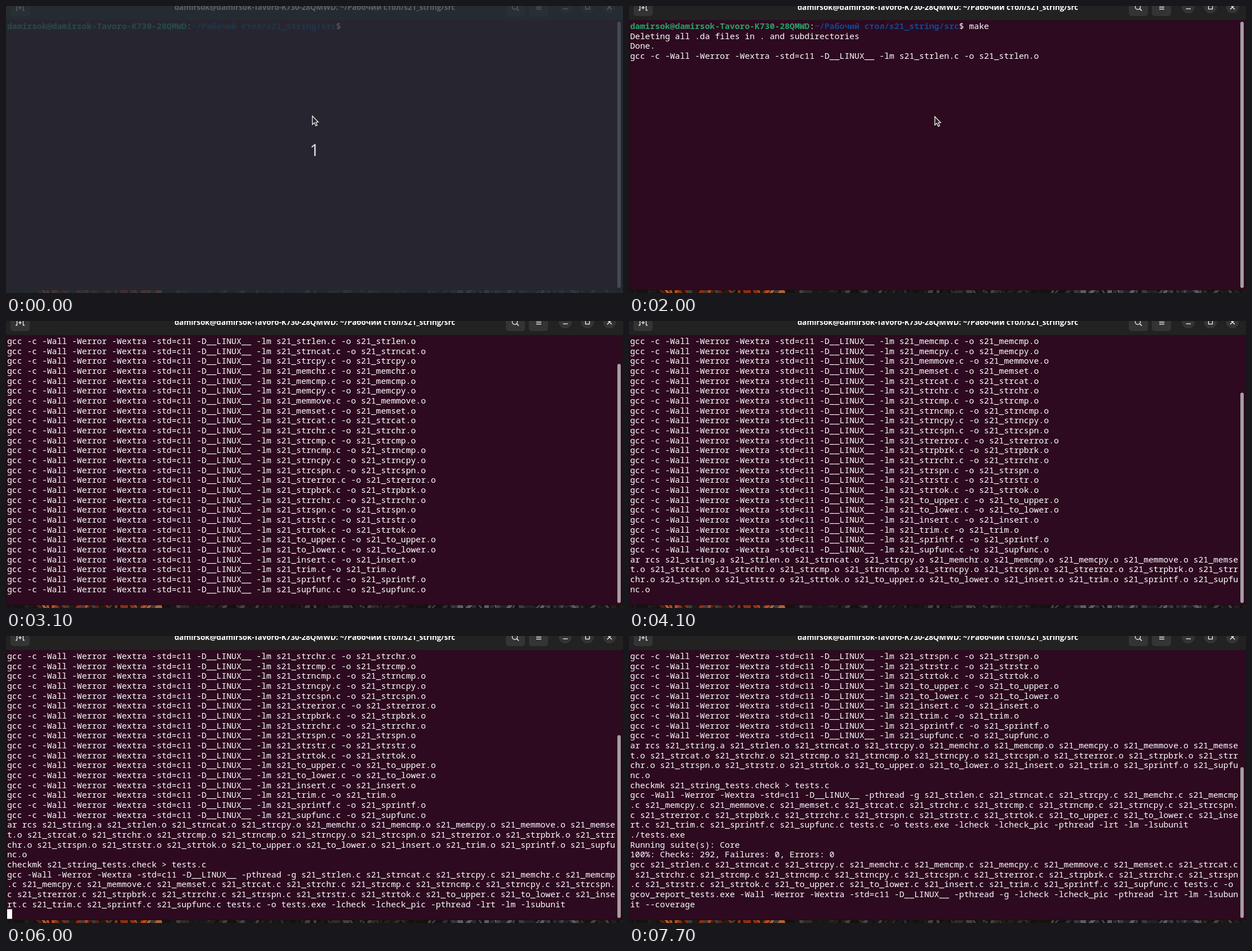
Recreate the animation shown at these times as an HTML page with a canvas. Size 1095 by 511 pixels, loop 8000 ms.

```html
<!DOCTYPE html>
<html lang="ru">
<head>
<meta charset="utf-8">
<title>Terminal build</title>
<style>
  html, body { margin: 0; width: 100%; height: 100%; overflow: hidden; background: #2d0a1f; }
  canvas { display: block; width: 1095px; height: 511px; }
</style>
</head>
<body>
<canvas id="stage" width="1095" height="511"></canvas>
<script>
const W = 1095, H = 511, LOOP = 8000;
const COLS = 122, ROWS = 27, CELL_W = 8.846, CELL_H = 17.67, LEFT = 2, TOP = 27;
const MONO = '14.75px "Noto Sans Mono", "DejaVu Sans Mono", monospace';
const WHITE = '#ffffff', GREEN = '#26a269', BLUE = '#12488b';
const ctx = document.getElementById('stage').getContext('2d');

const login = 'damirsok@damirsok-Tavoro-K730-28QMWD';
const path = '~/Рабочий стол/s21_string/src';
const prompt = `${login}:${path}$ `;

const units = ('strlen strncat strcpy memchr memcmp memcpy memmove memset strcat strchr strcmp ' +
  'strncmp strncpy strcspn strerror strpbrk strrchr strspn strstr strtok to_upper to_lower ' +
  'insert trim sprintf supfunc').split(' ');
const files = ext => units.map(u => `s21_${u}.${ext}`).join(' ');
const flags = '-Wall -Werror -Wextra -std=c11 -D__LINUX__';
const libs = '-lcheck -lcheck_pic -pthread -lrt -lm -lsubunit';

// Output after the per-file compile lines
const later = [
  [3300, `ar rcs s21_string.a ${files('o')}`],
  [5400, 'checkmk s21_string_tests.check > tests.c'],
  [5400, `gcc ${flags} -pthread -g ${files('c')} tests.c -o tests.exe ${libs}`],
  [7100, './tests.exe'],
  [7200, 'Running suite(s): Core'],
  [7200, '100%: Checks: 292, Failures: 0, Errors: 0'],
  [7300, `gcc ${files('c')} tests.c -o gcov_report_tests.exe ${flags} -pthread -g ${libs} --coverage`]
];
const keyTimes = [500, 600, 800, 900];
const blinkTimes = [100, 1700, 2300, 2900, 3500, 4100, 4700, 5400, 6000, 6500, 7100, 7700];
const passed = (times, t) => times.filter(x => x <= t).length;

function compiled(t) {
  if (t < 1400) return 0;
  if (t < 2200) return 1;
  return Math.min(units.length, 1 + Math.round(2.5 * (Math.floor((t - 2200) / 100) + 1)));
}

function wrap(line) {
  const rows = [];
  for (let i = 0; i < line.length; i += COLS) rows.push(line.slice(i, i + COLS));
  return rows;
}

function terminalRows(t) {
  const rows = [prompt + 'make'.slice(0, passed(keyTimes, t))];
  if (t < 1200) return rows;
  if (t >= 1400) rows.push('Deleting all .da files in . and subdirectories', 'Done.');
  for (const u of units.slice(0, compiled(t)))
    rows.push(`gcc -c ${flags} -lm s21_${u}.c -o s21_${u}.o`);
  for (const [at, line] of later) if (t >= at) rows.push(...wrap(line));
  rows.push('');
  return rows;
}

function box(x, y, w, h, r, color) {
  ctx.fillStyle = color;
  ctx.beginPath();
  ctx.roundRect(x, y, w, h, r);
  ctx.fill();
}

function stroke(points, width = 1.6, color = '#f2f2f2') {
  ctx.strokeStyle = color;
  ctx.lineWidth = width;
  ctx.beginPath();
  points.forEach(([x, y], i) => i ? ctx.lineTo(x, y) : ctx.moveTo(x, y));
  ctx.stroke();
}

function rect(x, y, w, h, color) {
  ctx.fillStyle = color;
  ctx.fillRect(x, y, w, h);
}

// Sliver of wallpaper below the window
function drawWallpaper() {
  let seed = 21;
  const rnd = () => (seed = seed * 16807 % 2147483647) / 2147483647;
  const dark = ['#14110f', '#241f1c', '#302b29', '#474140', '#1a181a'];
  const warm = ['#8c2e16', '#b84c1c', '#5c1d12', '#241a16', '#a8643a', '#443c39'];
  const pale = ['#4d4850', '#2f2b33', '#5f5b66', '#242128', '#3d3a45'];
  rect(0, 504, W, 7, '#14110f');
  for (let x = 0; x < W; x += 3 + rnd() * 8) {
    const set = x > 50 && x < 275 ? warm : x > 770 && x < 1010 ? pale : dark;
    const w = 3 + rnd() * 9, lean = rnd() * 10 - 5;
    ctx.fillStyle = set[Math.floor(rnd() * set.length)];
    ctx.beginPath();
    ctx.moveTo(x, 506);
    ctx.lineTo(x + w, 506);
    ctx.lineTo(x + w + lean, H);
    ctx.lineTo(x + lean, H);
    ctx.fill();
  }
}

function drawHeader() {
  const button = '#343434', mid = 2;
  rect(0, 0, W, 25, '#222222');
  for (const x of [8, 887, 928]) box(x, -16, 34, 34, 5, button);
  for (const x of [992.5, 1032, 1071]) box(x - 11.5, mid - 12, 23, 23, 11.5, button);

  // New tab
  stroke([[19.5, -3], [19.5, 7.5], [17, 7.5]], 1.3);
  stroke([[30.5, -3], [30.5, 7.5], [33, 7.5]], 1.3);
  stroke([[22, 3], [28, 3]], 1.3);
  stroke([[25, 0], [25, 6]], 1.3);

  // Search, menu and window controls
  ctx.beginPath();
  ctx.arc(903, 1.5, 4.6, 0, Math.PI * 2);
  ctx.stroke();
  stroke([[906.3, 4.8], [910, 8.5]]);
  for (const y of [-1.5, 2, 5.5]) stroke([[941, y], [950, y]], 1.4);
  stroke([[988.5, 5], [997, 5]], 1.3);
  ctx.strokeRect(1028.5, -1.5, 7, 7);
  stroke([[1067, -2], [1075, 6]], 1.4);
  stroke([[1075, -2], [1067, 6]], 1.4);

  ctx.font = 'bold 13.3px "Open Sans", "Noto Sans", sans-serif';
  ctx.textAlign = 'center';
  ctx.fillStyle = WHITE;
  ctx.fillText(`${login}: ${path}`, 548, 7);
}

function drawRow(text, row) {
  const isPrompt = text.startsWith(prompt);
  const nameEnd = login.length, pathEnd = nameEnd + 1 + path.length;
  const y = Math.round(TOP + row * CELL_H + 14);
  ctx.textAlign = 'left';
  for (let i = 0; i < text.length; i++) {
    if (text[i] === ' ') continue;
    const green = isPrompt && i < nameEnd;
    const blue = isPrompt && i > nameEnd && i < pathEnd;
    ctx.font = (green || blue ? 'bold ' : '') + MONO;
    ctx.fillStyle = green ? GREEN : blue ? BLUE : WHITE;
    ctx.fillText(text[i], LEFT + i * CELL_W, y);
  }
}

function drawTerminal(t) {
  const rows = terminalRows(t);
  const hidden = Math.max(0, rows.length - ROWS);
  const shown = rows.slice(hidden);
  rect(1, 25, W - 2, 480, '#2d0a1f');
  shown.forEach(drawRow);

  if (passed(blinkTimes, t) % 2) {
    const row = shown.length - 1;
    rect(LEFT + shown[row].length * CELL_W, TOP + row * CELL_H, CELL_W, CELL_H - 0.5, WHITE);
  }

  // The scrollbar grows slightly ahead of the text
  const early = t >= 5200 && t < 5400 ? 1 : 0;
  const top = 28 + 483 * (hidden + early) / (Math.max(ROWS, rows.length) + early);
  box(1085, top, 6, 502 - top, 3, '#a59da2');
}

function drawPointer(x, y) {
  const shape = [[0.7, 0.8], [0.7, 16], [4.2, 12.8], [6.8, 18.4], [9.3, 17.2], [6.9, 11.9], [11.2, 11.7]];
  ctx.beginPath();
  shape.forEach(([dx, dy]) => ctx.lineTo(x + dx, y + dy));
  ctx.closePath();
  ctx.fillStyle = '#252525';
  ctx.fill();
  ctx.strokeStyle = '#f0f0f0';
  ctx.lineWidth = 1.3;
  ctx.stroke();
}

function drawCountdown() {
  rect(0, 0, W, H, 'rgba(38, 47, 54, 0.75)');
  ctx.font = '29px "Noto Sans", "Open Sans", sans-serif';
  ctx.textAlign = 'center';
  ctx.fillStyle = '#dcdcdc';
  ctx.fillText('1', 547.5, 267);
}

function draw(t) {
  rect(0, 0, W, H, '#17110f');
  drawWallpaper();
  drawHeader();
  drawTerminal(t);
  if (t < 100) drawCountdown();
  if (t < 2000) drawPointer(543, 195);
  else if (t < 2200) drawPointer(542, 196);
}

// Every change falls on a tenth of a second
const start = performance.now();
let lastTick = -1;
function frame() {
  const tick = Math.floor((performance.now() - start) % LOOP / 100);
  if (tick !== lastTick) draw(tick * 100);
  lastTick = tick;
  requestAnimationFrame(frame);
}
frame();
</script>
</body>
</html>
```
